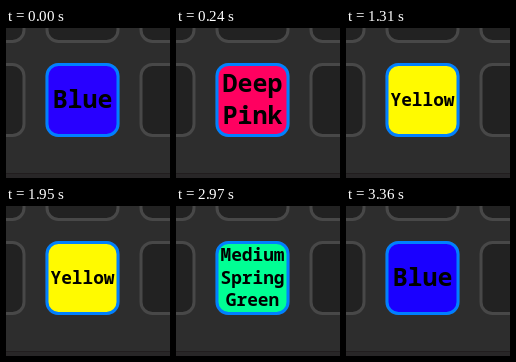
These frames come from a looping animation (164x150 px, 4020 ms). An HTML page:

```html
<!DOCTYPE html>
<html lang="en">
<head>
<meta charset="utf-8">
<title>Colour key</title>
<style>
  html, body { margin: 0; width: 100%; height: 100%; overflow: hidden; background: #2d2d2d; }
  svg { display: block; }
  .key { fill: #222; stroke: #484848; stroke-width: 3; }
  text { font-family: "Noto Sans Mono", "DejaVu Sans Mono", monospace; font-weight: 700; text-anchor: middle; }
</style>
</head>
<body>
<svg width="164" height="150" viewBox="0 0 164 150">
  <rect width="164" height="150" fill="#2d2d2d"/>
  <g id="keys"></g>
  <rect y="145" width="164" height="5" fill="#282627"/>
  <rect y="145" width="164" height="1" fill="#211d1e"/>
  <rect id="active" x="41" y="36.5" width="71" height="71" rx="11.5" stroke="#0080ff" stroke-width="3"/>
  <g id="label"></g>
</svg>
<script>
const NS = "http://www.w3.org/2000/svg";
const LOOP = 4020;
const PITCH = 94;
const states = [
  { start: 0, color: "#2800ff", size: 25, lines: ["Blue"] },
  { start: 240, color: "#ff0060", size: 25, lines: ["Deep", "Pink"] },
  { start: 1310, color: "#fffa00", size: 17.8, lines: ["Yellow"] },
  { start: 2380, color: "#00ff94", size: 17.8, lines: ["Medium", "Spring", "Green"] },
  { start: 3360, color: "#1a00ff", size: 25, lines: ["Blue"] }
];
const active = document.getElementById("active");
const label = document.getElementById("label");
let shown;

function add(parent, name, attrs, content = "") {
  const node = document.createElementNS(NS, name);
  for (const key in attrs) node.setAttribute(key, attrs[key]);
  node.textContent = content;
  parent.append(node);
}

function drawKeys() {
  const keys = document.getElementById("keys");
  for (const row of [-1, 0])
    for (const col of [-1, 0, 1])
      add(keys, "rect", {
        class: "key", x: 41 + col * PITCH, y: 36.5 + row * PITCH,
        width: 71, height: 71, rx: 11.5
      });
}

function show(state) {
  if (state === shown) return;
  shown = state;
  const { color, size, lines } = state;
  const step = size * 1.25;
  active.setAttribute("fill", color);
  label.replaceChildren();
  lines.forEach((line, i) => add(label, "text", {
    x: 76.5,
    y: 71.5 + size * 0.34 + (i - (lines.length - 1) / 2) * step,
    "font-size": size
  }, line));
}

function frame(now) {
  const time = now % LOOP;
  show(states.findLast(state => state.start <= time));
  requestAnimationFrame(frame);
}

drawKeys();
show(states[0]);
requestAnimationFrame(frame);
</script>
</body>
</html>
```
